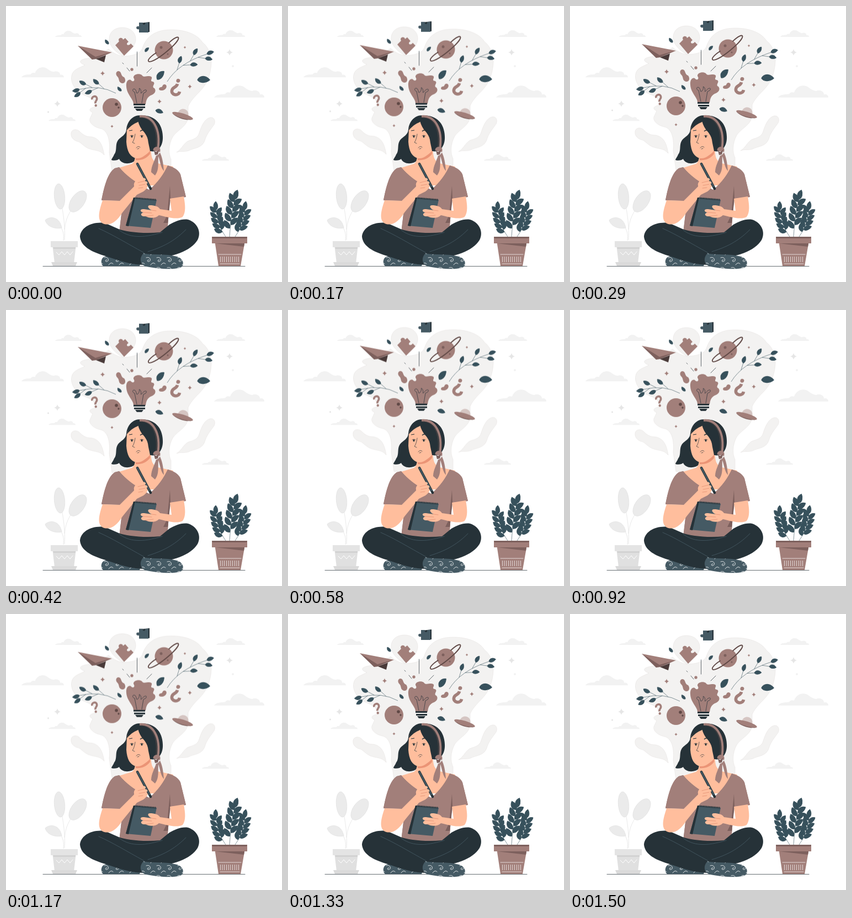
Animation of 500x500 px, one loop 1540 ms. Source, as an HTML page:

```html
<!DOCTYPE html>
<html lang="en">
<head>
<meta charset="utf-8">
<title>Thinking of ideas</title>
<style>
html, body { margin: 0; width: 100%; height: 100%; overflow: hidden; background: #fff; }
svg { display: block; width: 100vw; height: 100vh; }
#ideas { animation: bob 770ms cubic-bezier(.37, 0, .63, 1) -30ms infinite alternate; }
@keyframes bob { to { transform: translateY(-8.2px); } }
.m { fill: #a27f7a; } .md { fill: #7d605d; } .d { fill: #263238; } .t { fill: #455a64; }
.s { fill: #ffbe9d; } .g { fill: #f2f2f2; } .b { fill: #f3f2f1; }
.l { fill: none; stroke: #263238; stroke-width: .7; stroke-linecap: round; stroke-linejoin: round; }
.w { fill: none; stroke: #fff; stroke-linecap: round; stroke-linejoin: round; }
.q { fill: none; stroke: #a27f7a; stroke-width: 4; }
.green { fill: #37515c; stroke: #37515c; stroke-width: .6; }
</style>
</head>
<body>
<svg viewBox="0 0 500 500">
<defs>
  <path id="cloud" d="M0 25C4 18 14 19 22 18C24 14 28 14 32 15C36 2 52-3 62 6C68 10 72 12 76 12C84 8 92 14 91 19C96 18 100 20 100 25Z"/>
  <path id="star" d="M0-6Q1-1 6 0Q1 1 0 6Q-1 1-6 0Q-1-1 0-6Z"/>
  <path id="leaf" d="M0 0C2-4 7-4 10 0C7 2.500 2 3 0 0Z"/>
  <g id="ask"><path class="q" d="M-5-4C-5-11 6-11 5-4C5 0 0 0 0 5"/><circle class="m" cy="9.300" r="2.500"/></g>
  <pattern id="weave" width="62" height="74" x="183" y="314" patternUnits="userSpaceOnUse">
    <g class="w" stroke-width="14" style="stroke-linecap:butt" stroke-dasharray="1.400 2.600">
      <path d="M2 10H20M42 50H60"/>
      <path d="M38 8L52 22M8 44L20 58"/>
    </g>
    <path d="M0 8H26M34 12L56 12M0 50H26M36 50H62" stroke="#a27f7a" stroke-width="2"/>
  </pattern>
  <pattern id="curls" width="19" height="18" x="176" y="453" patternUnits="userSpaceOnUse">
    <rect class="t" width="19" height="18"/>
    <path class="w" stroke-width=".8" d="M2 3C10 0 12 10 6 10C3 10 4 6 7 7M10 16Q14 10 18 14"/>
  </pattern>
</defs>

<g class="g">
  <use href="#cloud" transform="translate(89 44)scale(.48)"/>
  <use href="#cloud" transform="translate(28 110)scale(.77)"/>
  <use href="#cloud" transform="translate(77 196)scale(.49)"/>
  <use href="#cloud" transform="translate(381 43)scale(.52)"/>
  <use href="#cloud" transform="translate(377 143)scale(.91)"/>
  <use href="#cloud" transform="translate(355 268)scale(.49)"/>
</g>
<g fill="#e6e6e6">
  <use href="#star" x="93" y="177"/>
  <use href="#star" x="405" y="84"/>
  <circle cx="411" cy="109" r="1.800" fill="#efefef"/>
</g>

<g id="ideas">
  <circle cx="76.500" cy="192" r="1.500" fill="#e4e4e4"/>
  <g class="b" stroke="#e3dfdd" stroke-width=".5">
    <path d="M146 95C165 93 177 83 186 78C192 84 203 90 212 91C228 90 242 88 247 77C253 58 265 48 285 44C315 40 345 48 356 66C366 73 372 88 372 103C371 125 364 142 350 156C341 165 333 174 330 182V203C327 219 311 224 302 237C294 252 294 268 299 278V300H192L187 265C189 245 185 225 171 222C158 219 150 211 152 204L157 193C148 189 152 184 161 183C164 173 154 166 143 162C126 155 116 139 119 126C121 115 133 112 143 107C134 104 129 98 146 95Z"/>
    <path d="M212 91C201 85 187 74 187 60C187 46 198 39 211 39C226 39 236 49 235 62C234 74 222 82 212 91Z"/>
    <path d="M118 230C119 224 126 222 132 226C140 234 145 237 155 237C170 240 175 252 178 270C169 260 163 263 149 258C137 252 136 246 128 245C121 242 117 237 118 230Z"/>
    <path d="M309 265C318 260 320 251 329 245C340 241 347 240 350 230C354 217 360 204 370 202C378 201 380 209 377 215C369 226 363 233 360 244C355 258 340 257 331 262C323 265 317 262 309 265Z"/>
  </g>

  <!-- puzzle pieces -->
  <path class="d" d="M243 31L260 29V47L243 48Z"/>
  <path class="t" d="M241 30H248C246 35 254 35 252 30H258V48H241V42C235 44 234 35 241 37Z"/>
  <path class="m" d="M198 71L205 64C201 58 211 55 212 61L216 58L222 65C215 69 222 74 226 68L231 73L214 90Z"/>

  <!-- paper plane -->
  <path class="m" d="M130 72L192 84L163 96Z"/>
  <path class="md" d="M130 72L156 97L163 96L190 84L162 92Z"/>
  <path d="M163 96L178 102L181 89Z" fill="#493a39"/>

  <!-- planet, moon, saucer -->
  <circle class="m" cx="286" cy="80" r="16.500"/>
  <g class="md"><circle cx="281" cy="75" r="2.500"/><circle cx="293" cy="87" r="1.500"/></g>
  <path d="M-14-4C-44-7-44 7 0 6C44 5 42-7 14-4" transform="translate(286 79)rotate(-38)" fill="none" stroke="#5f4845" stroke-width="1.800"/>
  <circle class="m" cx="192" cy="184" r="17"/>
  <g fill="#5f4845"><circle cx="200" cy="178" r="2.800"/><circle cx="204" cy="184" r="1.700"/></g>
  <g transform="translate(320 199)rotate(17)">
    <path d="M-10-2C-9-16 9-16 10-2Z" fill="#d5c5c2"/>
    <ellipse class="m" rx="19.500" ry="4.500"/>
    <path class="md" d="M-19 1C-10 7 10 7 19 1C10 5-10 5-19 1Z"/>
  </g>

  <use href="#ask" transform="translate(161 172)rotate(-12)scale(.9)"/>
  <use href="#ask" transform="translate(309 148)rotate(193)scale(1.4)"/>

  <!-- bulb -->
  <path class="m" d="M218 146C217 138 221 132 226 134C230 139 235 135 231 130C230 124 241 121 246 125C249 131 258 125 263 128C267 131 259 136 266 137C273 140 262 146 269 149C273 154 269 160 262 162C255 166 254 171 253 178H231C231 168 219 161 218 146Z"/>
  <path class="m" d="M203 118C210 117 207 127 214 129C218 134 216 141 210 140C203 138 206 132 202 128C198 124 199 119 203 118Z"/>
  <path class="m" d="M287 142C293 142 292 152 283 153C275 154 276 147 281 147C284 147 283 142 287 142Z"/>
  <path class="l" d="M237 176L233 156C227 154 230 148 234 151C238 156 235 160 239 157C244 152 239 147 243 150C247 156 242 160 246 157C252 149 257 152 253 156L249 158L246 176"/>
  <path class="d" d="M231 177H252V180H231ZM232 182H252V185H232ZM234 186H249L246 190H237Z"/>
  <path class="l" d="M237.500 83V109M264 112L255 121M211 103L213 105M219 112L224 118"/>
  <circle class="m" cx="228" cy="115" r="2.700"/>

  <g id="sprigs" class="green">
    <use href="#leaf" transform="translate(274 133)rotate(-50)scale(1.9)"/>
    <use href="#leaf" transform="translate(347 134)scale(2.2)"/>
    <use href="#leaf" transform="translate(252 83)rotate(-48)"/>
    <use href="#leaf" transform="translate(186 69)rotate(232)"/>
    <use href="#leaf" transform="translate(271 189)rotate(18)scale(1.400)"/>
    <use href="#leaf" transform="translate(209 154)rotate(228)"/>
  </g>
  <g class="m">
    <use href="#star" transform="translate(175 122)scale(.75)"/>
    <use href="#star" transform="translate(333 146)scale(.65)"/>
    <use href="#star" transform="translate(278 173)scale(.7)"/>
    <use href="#star" transform="translate(324 75)scale(.4)"/>
    <use href="#star" transform="translate(192 218)scale(.45)"/>
  </g>
</g>

<path class="l" d="M67 471.500H433"/>

<!-- pale plant -->
<g fill="#ebebeb" stroke="#e0e0e0" stroke-width=".7">
  <path d="M106 424C108 390 101 365 96 330M106 405C108 380 120 366 135 347M104 425C107 405 96 390 76 389" fill="none"/>
  <ellipse cx="97" cy="345" rx="9.500" ry="23" transform="rotate(-5 97 345)"/>
  <ellipse cx="130" cy="354" rx="12" ry="22" transform="rotate(35 130 354)"/>
  <path d="M71 388C81 379 98 383 101 402C85 405 73 397 71 388Z"/>
</g>
<path d="M84 432H127L123 466H88Z" fill="#e0e0e0"/>
<path d="M81 426H130V437H81Z" fill="#e4e4e4"/>
<path d="M85 437H126V440H86Z" fill="#d2d2d2"/>
<path d="M82 464H129L126 471H85Z" fill="#dadada"/>
<path class="w" d="M91 446l5 5l5-6l5 6l5-6l5 6l5-6"/>

<!-- dark plant -->
<g id="plant" class="green"></g>
<path class="m" d="M378 425H433L425 471H385Z"/>
<path class="md" d="M379 430H432L431 436Z"/>
<path class="m" d="M373 418H437V430H373Z"/>
<path class="md" d="M373 418H437L436 421H374Z"/>
<path class="w" d="M385 450H426M388 467H423" stroke-width=".7"/>
<path d="M388 459H423" stroke="#fff" stroke-width="10" stroke-dasharray=".7 3"/>

<!-- woman: back hair, neck, shirt -->
<path class="d" d="M245 198C228 197 219 211 218 224C217 234 209 236 203 243C197 251 202 262 196 269C194 274 191 277 191 279C197 281 203 279 205 277C209 287 226 288 235 279L262 263C275 266 285 254 284 236C283 213 270 198 245 198Z"/>
<path class="s" d="M234 268L263 256C262 273 265 281 275 285L303 291L289 325H232L202 294L228 286C233 283 234 276 234 268Z"/>
<path d="M235 275C247 275 257 268 261 262V268C254 277 245 280 235 279Z" fill="#eb9476"/>
<path id="shirt" class="m" d="M197 294L205 292C216 306 235 320 259 333C276 320 287 302 293 289C303 292 312 296 316 305L326 346L297 349L292 411H205L212 353L173 352C177 332 183 303 197 294Z"/>
<use href="#shirt" style="fill:url(#weave)"/>
<path class="md" d="M297 326L292 379L285 393H293L298 349Z"/>

<!-- face, fringe, headband -->
<path class="s" d="M219 222C224 213 232 208 239 208C243 224 253 233 265 237L263 255C258 267 247 277 236 276C225 274 219 263 218 246Z"/>
<path class="d" d="M239 202C230 205 222 212 218 226C227 215 235 212 241 209C244 224 255 231 257 242C258 250 260 256 261 263C270 264 279 258 281 246C283 224 266 202 239 202Z"/>
<path d="M242 200C266 198 281 222 275 260" fill="none" stroke="#a27f7a" stroke-width="4"/>
<path d="M244 202C263 201 276 222 272 256" fill="none" stroke="#6d5350" stroke-width=".7"/>
<path class="m" d="M267 262C265 256 275 252 279 258C281 264 277 270 272 271C269 281 263 290 263 301L270 307C278 297 275 284 276 272C280 284 280 292 286 299C285 285 283 272 278 264Z"/>
<path class="md" d="M268 262Q273 267 278 259L275 269L270 270Z"/>
<path class="l" d="M234 232C233 239 231 245 229 247L233 249M236 257C238 254 242 254 243 256M238 259L241 258"/>
<path d="M223 226L229 225M243 227Q247 223 252 227" fill="none" stroke="#263238" stroke-width="1.200"/>
<ellipse class="d" cx="228" cy="236.500" rx="1.500" ry="2"/>
<ellipse class="d" cx="246" cy="236.500" rx="1.500" ry="2"/>
<path class="l" d="M225 235q3-2 6 0m12 0q3-2 6 0"/>

<!-- legs and feet -->
<path fill="url(#curls)" d="M174 458C178 448 222 450 246 461L242 471H176C172 468 172 462 174 458Z"/>
<path class="d" d="M179 393C154 390 135 402 134 418C136 436 155 445 177 452C202 460 225 469 249 469L254 456C297 458 334 445 347 424C355 409 346 392 330 387C317 385 306 391 296 396L279 410C248 413 218 409 204 404Z"/>
<path class="l" d="M168 403C193 414 219 430 250 447L249 456M257 445C290 435 309 422 326 405M205 406C222 419 245 422 283 410" style="stroke:#526b76;stroke-width:.6"/>
<path fill="url(#curls)" d="M249 448C267 452 288 448 310 454C321 457 325 470 316 474C299 479 271 475 254 472C241 468 242 455 249 448Z"/>

<!-- arms, notebook, pencil -->
<path class="s" d="M175 352L206 353L232 327C237 312 248 309 254 312C262 317 258 330 249 336L237 342L211 374C201 390 190 398 178 395C163 390 169 370 175 352Z"/>
<path class="t" d="M231 347L273 351L262 402L217 398Z"/>
<path class="d" d="M231 347H234L222 399L217 398Z"/>
<path d="M235 348L272 351" stroke="#263238" stroke-width="3" stroke-dasharray="1.500 1"/>
<path class="s" d="M297 349L322 345C325 361 326 374 320 382C309 388 291 382 277 379C270 386 258 384 253 381C244 382 242 376 249 374C242 373 242 367 250 368L264 370C257 367 255 361 261 361C269 361 276 363 279 368L300 371Z"/>
<path d="M238 286L262 331" stroke="#263238" stroke-width="4.500" stroke-linecap="round"/>
<path d="M238 286L260 327" stroke="#455a64" stroke-width="2.500" stroke-linecap="round"/>
<path class="s" d="M232 326C230 318 239 313 246 312C251 310 256 314 251 317C259 318 257 323 252 323C256 326 253 331 246 333L233 338Z"/>
<path class="l" d="M239 320L251 317M241 325L252 323M240 330L248 329M249 374L264 375M252 381L267 379M264 370L272 371" style="stroke:#dd8a6e"/>
</svg>

<script>
const NS = 'http://www.w3.org/2000/svg';

function add(parent, tag, attrs) {
  const el = document.createElementNS(NS, tag);
  for (const k in attrs) el.setAttribute(k, attrs[k]);
  document.getElementById(parent).appendChild(el);
}

// A curved stem with leaves on alternating sides; stalk is the gap to each leaf.
function grow(parent, [x0, y0, cx, cy, x1, y1], { count, size, spread, stalk, from }) {
  const leaf = (x, y, angle) => add(parent, 'use', {
    href: '#leaf', transform: `translate(${x} ${y})rotate(${angle})scale(${size / 10})`
  });
  let d = `M${x0} ${y0}Q${cx} ${cy} ${x1} ${y1}`;
  for (let i = 0; i <= count; i++) {
    const u = from + (1 - from) * i / count, v = 1 - u;
    const x = v * v * x0 + 2 * u * v * cx + u * u * x1;
    const y = v * v * y0 + 2 * u * v * cy + u * u * y1;
    const dx = v * (cx - x0) + u * (x1 - cx), dy = v * (cy - y0) + u * (y1 - cy);
    const side = i === count ? 0 : i % 2 ? 1 : -1;
    const a = Math.atan2(dy, dx) + side * spread;
    const gap = side ? stalk : 0;
    const ex = x + gap * Math.cos(a), ey = y + gap * Math.sin(a);
    d += `M${x} ${y}L${ex} ${ey}`;
    leaf(ex, ey, a * 180 / Math.PI);
  }
  add(parent, 'path', { d, style: 'fill:none' });
}

const sprig = { count: 4, size: 13, spread: .55, stalk: 13, from: .35 };
grow('sprigs', [292, 137, 312, 104, 364, 87], sprig);
grow('sprigs', [199, 158, 170, 142, 133, 151], { ...sprig, spread: -.5 });

const shrub = { count: 9, size: 15, spread: .7, stalk: 1, from: .2 };
grow('plant', [398, 418, 383, 398, 381, 369], shrub);
grow('plant', [405, 418, 407, 380, 415, 350], { ...shrub, size: 17 });
grow('plant', [415, 418, 430, 398, 433, 369], shrub);
</script>
</body>
</html>
```
